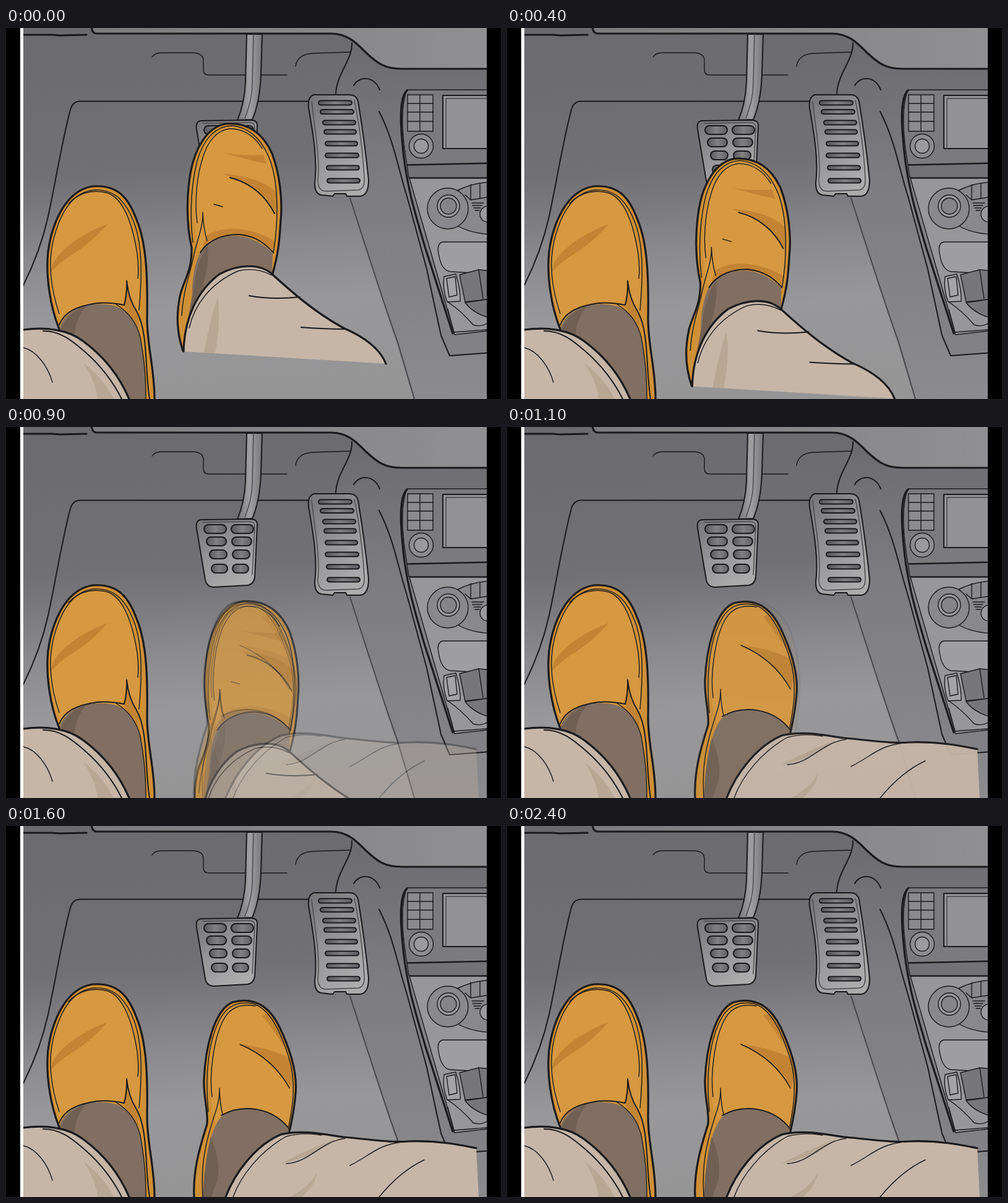
Animation, 800 px wide and 600 px high, one loop 2.5 s. Source, as an HTML page:

```html
<!DOCTYPE html>
<html lang="en">
<head>
<meta charset="utf-8">
<title>Releasing the brake</title>
<style>
html, body { margin: 0; width: 100%; height: 100%; overflow: hidden; background: #000; }
svg { display: block; width: 100vw; height: 100vh; }
.ln { fill: none; stroke: #1a1a1d; stroke-width: 2; stroke-linecap: round; stroke-linejoin: round; }
.thin { stroke-width: 1.4; }
.bold { stroke-width: 3.2; }
.soft { stroke: #47474b; }
.shoe { fill: #d69840; }
.side { fill: #cf9036; }
.fold { fill: #c28433; }
.sock { fill: #806f62; }
.sockDark { fill: #706054; }
.cloth { fill: #c5b6a8; }
.clothDark { fill: #b8a795; }
</style>
</head>
<body>
<svg viewBox="0 0 800 600">
  <defs>
    <linearGradient id="floor" x1="0" y1="0" x2=".08" y2="1">
      <stop offset="0" stop-color="#6b6a6e"/><stop offset=".4" stop-color="#717075"/>
      <stop offset=".5" stop-color="#7a7a7f"/><stop offset=".62" stop-color="#8a8a8e"/>
      <stop offset=".78" stop-color="#98989a"/><stop offset="1" stop-color="#959596"/>
    </linearGradient>
    <linearGradient id="dash" x1="0" y1="0" x2="1" y2="0">
      <stop offset="0" stop-color="#7c7c7e"/><stop offset="1" stop-color="#909092"/>
    </linearGradient>
    <linearGradient id="tunnel" x1="0" y1="0" x2="0" y2="1">
      <stop offset="0" stop-color="#6c6b6f"/><stop offset=".4" stop-color="#7d7d81"/>
      <stop offset="1" stop-color="#8b8b8e"/>
    </linearGradient>
    <linearGradient id="metal" x1="0" y1="0" x2=".6" y2="1">
      <stop offset="0" stop-color="#747477"/><stop offset=".5" stop-color="#949496"/>
      <stop offset="1" stop-color="#acacad"/>
    </linearGradient>
    <linearGradient id="arm">
      <stop offset="0" stop-color="#77777a"/><stop offset=".5" stop-color="#a0a0a2"/>
      <stop offset="1" stop-color="#77777a"/>
    </linearGradient>
    <linearGradient id="slot">
      <stop offset="0" stop-color="#58585c"/><stop offset=".5" stop-color="#818184"/>
      <stop offset="1" stop-color="#606064"/>
    </linearGradient>
    <clipPath id="view"><path d="M28 0H777V600H28Z"/></clipPath>
  </defs>
  <rect width="800" height="600"/>
  <path d="M23 0H28V600H23Z" fill="#fff"/>
  <g clip-path="url(#view)">
    <g id="car"></g>
    <g id="leftLeg"></g>
    <g id="pressLeg"></g>
    <g id="restLeg"></g>
  </g>
</svg>
<script>
const $ = id => document.getElementById(id);
const line = (d, cls = "") => `<path class="ln ${cls}" d="${d}"/>`;
const area = (d, cls) => `<path class="${cls}" d="${d}"/>`;
const fill = (d, color) => `<path fill="${color}" d="${d}"/>`;
const paint = (d, color, cls = "") => `<path class="ln ${cls}" style="fill:${color}" d="${d}"/>`;
const pill = (x, y, w, h) =>
  `<rect class="ln" style="fill:url(#slot)" x="${x}" y="${y - h / 2}" width="${w}" height="${h}" rx="${h / 2}"/>`;
const ring = (x, y, r, color) =>
  `<circle class="ln thin" style="fill:${color}" cx="${x}" cy="${y}" r="${r}"/>`;

const brakeRows = [[165, 320, 364, 36], [185, 324, 365, 32], [206, 329, 366, 28], [229, 332, 366, 26]];
const gasRows = [[121, 505, 54], [135.5, 508, 54], [153, 512, 53], [168, 514, 52],
  [187, 516, 52], [206, 516, 54], [226, 518, 53], [247, 519, 53]];

const shell =
  fill("M28 0H777V600H28Z", "url(#floor)") +
  line("M28 416C42 388 58 350 68 305C80 250 90 185 104 132Q108 118 121 118.5H492") +
  line("M236 47Q240 40 252 40H303Q319 41 319 53V68Q319 76 328 76H454", "thin") +
  line("M468 62C470 48 480 42 495 41L556 39", "thin") +
  fill("M558 22C560 50 536 70 532 106L556 275L660 600H777V60H620Z", "url(#tunnel)") +
  line("M556 275C580 350 615 460 632 505L660 600", "soft") +
  line("M559 24C560 52 535 72 533 106") +
  line("M562 93C570 78 594 76 604 100") +
  paint("M138 -5Q138 9 147 9H525C552 9 566 24 582 40C600 57 612 66 640 66H785V-5Z", "url(#dash)", "bold") +
  line("M28 11H74L86 12L130 11", "bold");

const console_ =
  fill("M648 100C636 112 638 150 640 190L648 270L680 390L703 497L717 530L785 526V100Z", "#828286") +
  line("M603 135C627 182 633 225 648 272L680 390L703 497L717 530L785 525") +
  paint("M648 100H785V218L648 221C641 180 636 130 648 100Z", "#7b7b7e", "thin") +
  paint("M648 222L785 219V242H651Z", "#737377", "thin") +
  paint("M652 243H785V489L725 496Z", "#97979a", "thin") +
  line("M648 101C636 113 637 150 641 190C646 250 661 300 678 357L722 494", "bold") +
  paint("M649 108H690V167H649Z", "#8b8b8d", "thin") +
  line("M669 108V167M649 122H690M649 136H690M649 151H690", "thin") +
  paint("M706 109H785V195H706Z", "#929294") +
  line("M711 195V114H777", "thin soft") +
  ring(671, 191, 19.5, "#8d8d90") + ring(671, 191, 11.5, "#9b9b9d") +
  paint("M729 263Q755 250 785 249V334Q750 332 730 320Z", "#89898c", "thin") +
  line("M742 270L751 278L777 274M751 253V278M766 251V276", "thin") +
  line("M753 283H772M754 287H769M756 291H767M758 295H765", "thin") +
  ring(779, 301, 13, "#9a9a9c") +
  ring(714, 292, 33, "#89898d") + ring(715, 288, 18, "#9a9a9d") + ring(715, 288, 13, "#858589") +
  paint("M706 346H785V398L718 394Q703 392 699 364Q696 348 706 346Z", "#9e9ea0", "thin") +
  paint("M708 402L727 398Q735 424 734 442L713 443Q705 422 708 402Z", "#a4a4a6", "thin") +
  line("M712 405L726 402L729 432L716 435Z", "thin") +
  paint("M733 399L764 391L785 393V438L742 443Z", "#77777a", "thin") +
  line("M764 391L771 438M714 443C729 453 742 465 755 480Q767 484 777 478", "thin") +
  paint("M742 444L785 438V470Q755 462 742 444Z", "#77777a", "thin") +
  line("M714 455L724 492L777 488", "thin");

const pedals =
  paint("M389 10L387 88C386 112 382 130 374 149L398 148C408 125 411 100 412 76L414 10Z", "url(#arm)") +
  line("M400 10L398 91C397 115 392 130 386 146", "thin soft") +
  paint("M315 150L397 149Q407 150 406 159L402 243Q400 255 390 256L335 259Q324 258 322 247L308 164Q306 151 315 150Z", "url(#metal)") +
  line("M318 154L394 153Q402 153 402 161L398 239", "thin soft") +
  brakeRows.map(([y, a, b, w]) => pill(a, y, w, 14) + pill(b, y, w, 14)).join("") +
  paint("M497 108H556Q566 108 569 119C575 155 582 205 586 246Q586 271 572 272L551 272L549 268H531L528 272L509 270Q499 268 499 251C504 210 495 165 489 129Q487 112 497 108Z", "url(#metal)") +
  line("M494 119C499 165 508 210 504 247Q504 263 516 264L570 262Q580 259 579 244C577 200 570 150 563 117", "thin soft") +
  gasRows.map(([y, x, w]) => pill(x, y, w, 7)).join("");

$("car").innerHTML = shell + console_ + pedals;

const leftShoe = "M86 487C71 450 64 400 68 362C74 318 95 263 140 256C181 253 198 275 211 310C228 350 229 410 228 470C228 515 240 550 240 600";
const leftHem = "M28 488C65 483 100 488 124 506C157 530 182 560 199 600";
$("leftLeg").innerHTML =
  area(leftShoe + "H222L205 480Z", "side") +
  area("M88 475C73 445 68 400 72 362C79 315 100 270 135 263C170 260 189 278 199 306C216 350 217 410 213 480L194 446Z", "shoe") +
  area("M72 396C74 378 84 368 94 358Q122 333 164 317C151 333 128 354 103 369Q86 379 72 396Z", "fold") +
  area("M195 409Q198 435 214 465V500L190 447Z", "fold") +
  area("M86 488C93 459 125 444 158 447C190 447 211 470 217 500C224 540 226 565 226 600H185L120 510Z", "sock") +
  area("M88 488Q97 462 130 449C116 465 110 485 111 500Z", "sockDark") +
  line(leftShoe, "bold") +
  line("M86 462C72 420 68 380 76 345C86 304 105 265 143 262C178 260 196 285 207 315C222 355 219 412 215 456", "thin") +
  line("M101 284C119 264 145 261 165 267C192 278 205 320 212 365Q215 390 213 405", "thin") +
  line("M86 480C94 460 113 450 147 445Q167 443 191 448Q196 430 195 409Q198 438 211 458C230 492 224 550 232 600") +
  line("M178 447Q208 465 217 500C224 540 226 565 226 600", "thin") +
  area(leftHem + "H28Z", "cloth") +
  area("M125 542Q157 566 174 600H148Q145 572 125 542Z", "clothDark") +
  line(leftHem, "bold") +
  line("M60 490C90 490 108 507 128 524C153 546 174 574 187 600") +
  line("M28 517C50 522 68 548 75 573", "thin");

const pressShoe = "M286 522C275 490 275 460 282 430C288 407 301 392 300 355C291 315 292 270 298 235C305 195 325 160 355 155C390 152 415 170 430 203C443 238 447 280 444 310C442 345 440 365 431 397";
const pressHem = "M287 523C288 470 309 425 345 398C375 382 410 380 430 398C465 430 500 460 545 485C580 500 605 520 614 543";
$("pressLeg").innerHTML =
  area(pressShoe + "L345 420Z", "side") +
  area("M313 367C300 320 302 260 312 220C322 180 340 163 361 160C389 158 410 178 422 203C438 240 439 300 432 364L375 335Z", "shoe") +
  area("M350 202Q380 210 421 220L416 205Q380 207 350 202Z", "fold") +
  area("M350 236C390 238 424 250 438 268L438 303Q412 256 350 236Z", "fold") +
  area("M324 336C350 319 396 321 435 345L433 360C405 332 354 327 318 354Z", "fold") +
  area("M301 430C301 393 310 366 320 353C346 331 394 326 431 364L430 398L350 415L290 500Z", "sock") +
  area("M303 426Q306 380 326 352Q329 383 316 425L292 480Z", "sockDark") +
  line(pressShoe, "bold") +
  line("M302 347C296 300 300 250 309 215C320 177 340 159 364 158C393 160 412 180 424 207C441 245 441 310 432 364", "thin") +
  line("M309 315C305 288 307 245 317 213C326 180 343 165 361 163C383 162 402 175 414 195", "thin") +
  line("M318 298C319 322 308 345 303 370C297 400 286 425 284 465M318 298Q319 325 325 344", "thin") +
  line("M314 363C328 341 354 333 378 334C405 337 420 350 432 363") +
  line("M362 242C395 250 420 272 434 300") +
  line("M336 285L350 289", "thin") +
  area(pressHem + "Z", "cloth") +
  area("M342 435Q348 472 338 526L320 525Q329 475 342 435Z", "clothDark") +
  line(pressHem, "bold") +
  line("M296 485C305 447 330 413 375 393Q403 386 430 400", "thin") +
  line("M393 433Q430 440 475 435M477 484Q515 487 550 487");

const restShoe = "M304 600C302 557 313 520 325 482C327 460 319 440 320 410C322 360 336 298 366 285C400 276 425 290 442 325C461 365 471 400 468 432C466 460 462 477 458 494";
const restHem = "M355 600C370 560 404 516 444 499C480 490 520 500 545 503C600 508 620 512 650 510C700 508 740 517 760 521";
$("restLeg").innerHTML =
  area(restShoe + "L340 600Z", "side") +
  area("M339 480C323 420 326 365 342 323C356 289 374 284 397 286C426 291 444 337 457 374C470 415 463 455 457 486L400 457Z", "shoe") +
  area("M378 353Q420 357 462 376L466 400L459 425Q425 374 378 353Z", "fold") +
  area("M414 306L429 302Q453 342 464 379Q432 329 414 306Z", "fold") +
  area("M318 600C321 545 328 490 350 468C382 449 430 454 458 490L450 510L355 600Z", "sock") +
  area("M331 503Q347 540 342 572L332 600H318Q321 540 331 503Z", "sockDark") +
  line(restShoe, "bold") +
  line("M327 462C321 400 328 349 343 318C357 288 376 284 398 287C428 295 445 337 457 374C470 415 463 455 457 486", "thin") +
  line("M333 438C328 400 336 345 350 316C362 291 382 287 403 291", "thin") +
  line("M345 424C346 447 337 465 331 487C317 533 316 565 318 600M345 424Q346 452 350 466", "thin") +
  line("M348 468C382 449 430 454 458 490") +
  line("M378 353C413 368 440 390 458 424", "thin") +
  area(restHem + "L764 600Z", "cloth") +
  area("M443 546Q495 520 532 506Q505 534 443 546ZM459 600Q492 582 502 561Q500 582 478 600Z", "clothDark") +
  line(restHem, "bold") +
  line("M367 600C380 564 412 525 453 502Q480 495 510 500", "thin") +
  line("M453 546C491 544 507 511 548 505M556 549C590 532 600 516 640 511M603 600C625 573 648 553 676 540", "thin");

const loop = 2500, step = 100;
const clamp = v => Math.min(1, Math.max(0, v));

function render(now) {
  const t = Math.floor((now % loop) / step) * step;
  const slide = Math.min(t, 900) / 100;
  const settled = clamp((t - 800) / 320);
  $("pressLeg").setAttribute("transform", `translate(${3.1 * slide} ${14.1 * slide})`);
  $("pressLeg").setAttribute("opacity", 1 - settled);
  $("restLeg").setAttribute("opacity", settled);
}

const start = performance.now();
function tick() {
  render(performance.now() - start);
  requestAnimationFrame(tick);
}
tick();
</script>
</body>
</html>
```
